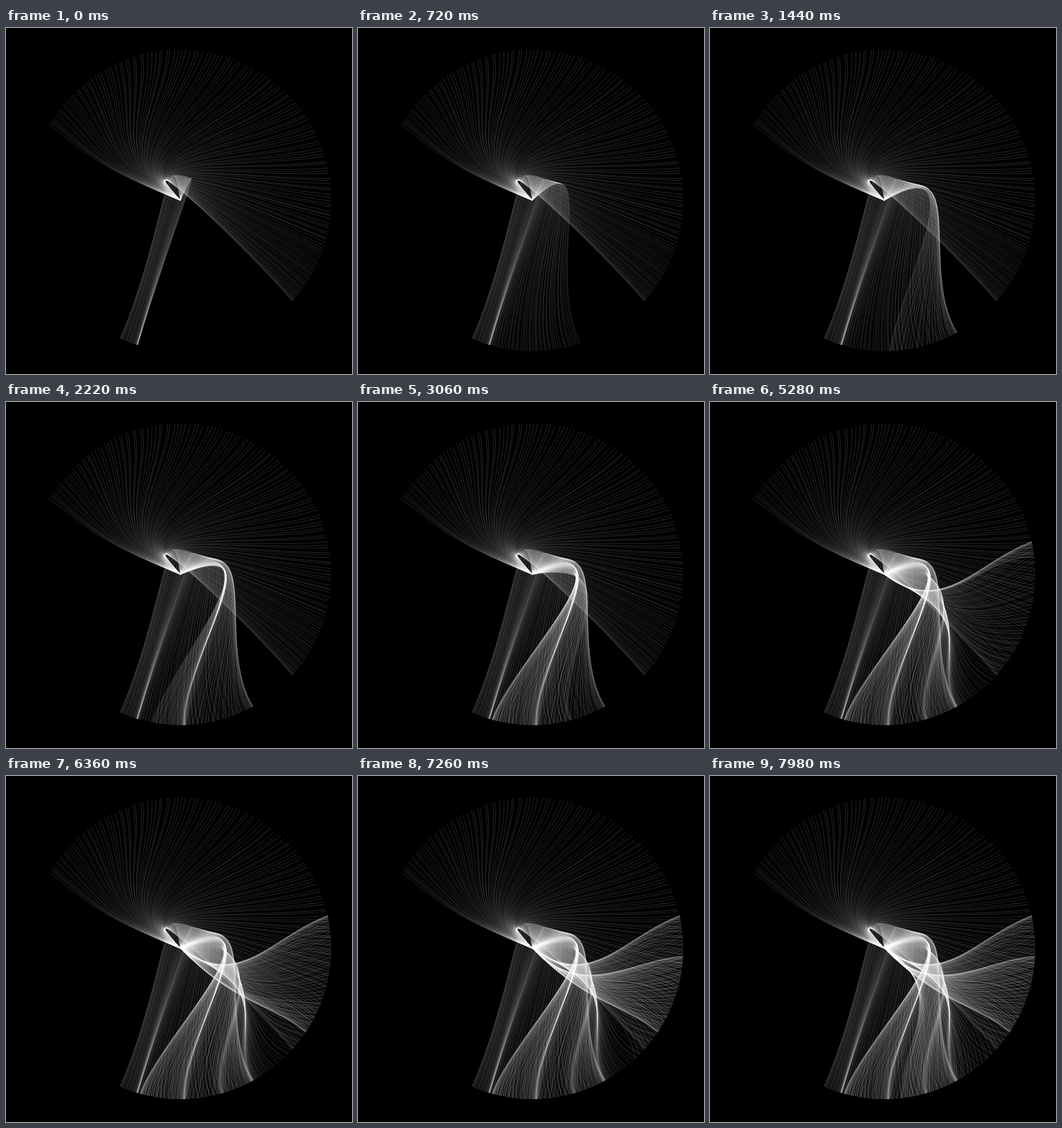
Write an HTML page with a canvas that moves like this. It is 500x500 px and loops after 8000 ms.

```html
<!DOCTYPE html>
<html lang="en">
<head>
<meta charset="utf-8">
<title>Swaying threads</title>
<style>
  html, body { margin: 0; width: 100%; height: 100%; overflow: hidden; background: #000; }
  canvas { display: block; width: 100vmin; height: 100vmin; }
</style>
</head>
<body>
<canvas id="stage" width="500" height="500"></canvas>
<script>
const LOOP = 8000, TICK = 60, PER_TICK = 4;
const SWAY_START = -9, SWAY_END = 133, FAN_THREADS = 160;
const HUB = { x: 252, y: 249 }, RADIUS = 218;

// Turning points and pauses: [tick, angle in degrees]
const RIM = [
  [-9, 113.6], [-3, 106.8], [0, 106.4], [7, 88], [17, 61.2], [24, 88], [28, 89],
  [42, 105.4], [51, 74.6], [54, 73.5], [62, 62], [65, 61], [70, 52.8],
  [84, -12.5], [101, 33.8], [112, 3], [126, 72.6], [133, 84]
];
const ROOT = [[-9, -98], [0, -65], [20, -33], [44, -17], [84, 36], [112, 46], [133, 29]];

// Smooth curve through the points that rests at each turn and never overshoots
function follow(points, t) {
  const last = points.length - 1;
  t = Math.min(points[last][0], Math.max(points[0][0], t));
  const slope = i => (points[i + 1][1] - points[i][1]) / (points[i + 1][0] - points[i][0]);
  const tangent = i => {
    if (i === 0) return slope(0);
    if (i === last) return slope(last - 1);
    const a = slope(i - 1), b = slope(i);
    return a * b <= 0 ? 0 : 2 * a * b / (a + b);
  };
  let i = 0;
  while (i < last - 1 && t >= points[i + 1][0]) i++;
  const span = points[i + 1][0] - points[i][0];
  const u = (t - points[i][0]) / span, v = 1 - u;
  return v * v * (1 + 2 * u) * points[i][1] + u * u * (3 - 2 * u) * points[i + 1][1] +
    span * u * v * (v * tangent(i) - u * tangent(i + 1));
}

function random(n) {
  const s = Math.sin(n * 127.1 + 31.7) * 43758.5453;
  return s - Math.floor(s);
}

function polar(degrees, radius) {
  const a = degrees * Math.PI / 180;
  return [HUB.x + radius * Math.cos(a), HUB.y + radius * Math.sin(a)];
}

// A thread leaves the hub towards root, bends past mid and ends on the rim
function makeThread(tick, root, mid, rim) {
  const path = new Path2D();
  path.moveTo(HUB.x, HUB.y);
  path.bezierCurveTo(...polar(...root), ...polar(...mid), ...polar(rim, RADIUS));
  return { tick, path };
}

function fanThread(u) {
  const f = 1 - (1 - u ** 1.25) ** 1.6;
  const rim = -150 + 192 * f;
  return makeThread(-Infinity,
    [-158 + 26 * f * f, 113],
    [rim - 5 - 12 * f ** 3, 140 - 77 * f * f],
    rim);
}

function swayThread(tick, t) {
  const reach = Math.max(0, Math.sin(Math.PI * t / 84));
  const growth = 1 - Math.exp(-Math.max(0, t) / 18);
  return makeThread(tick,
    [follow(ROOT, t), 112 + 58 * reach],
    [follow(RIM, t - 2.5), 65 + 80 * growth],
    follow(RIM, t));
}

const threads = [];
for (let i = 0; i < FAN_THREADS; i++) {
  threads.push(fanThread((i + 0.8 * random(i)) / FAN_THREADS));
}
for (let n = SWAY_START * PER_TICK; n <= SWAY_END * PER_TICK; n++) {
  threads.push(swayThread(n / PER_TICK, (n - 0.8 * random(n)) / PER_TICK));
}

const ctx = document.getElementById('stage').getContext('2d');
let shown = -1;

function draw(tick) {
  ctx.clearRect(0, 0, 500, 500);
  ctx.strokeStyle = 'rgba(255, 255, 255, 0.16)';
  ctx.lineWidth = 0.9;
  for (const thread of threads) {
    if (thread.tick <= tick) ctx.stroke(thread.path);
  }
  shown = tick;
}

function frame() {
  const tick = Math.floor((performance.now() % LOOP) / TICK);
  if (tick !== shown) draw(tick);
  requestAnimationFrame(frame);
}
frame();
</script>
</body>
</html>
```
